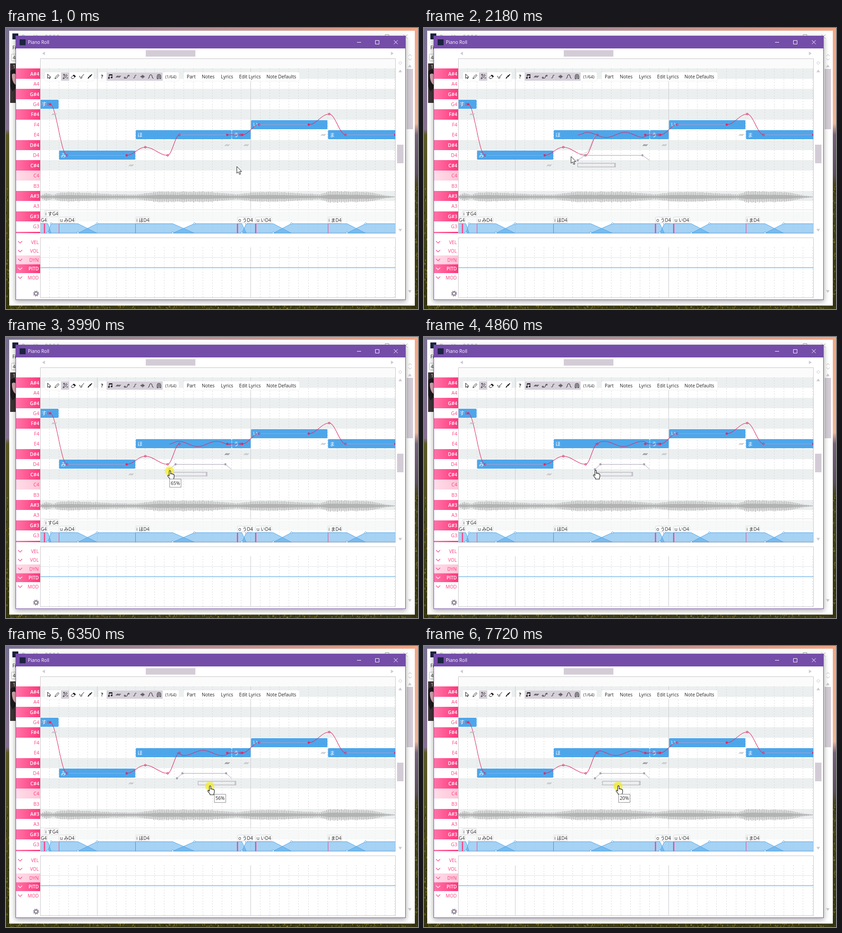
Write an HTML page that moves like this. It is 905 px wide and 619 px high and loops after 8 s.

```html
<!DOCTYPE html>
<html lang="en">
<head>
<meta charset="utf-8">
<title>Piano Roll</title>
<style>
html, body { margin: 0; width: 100%; height: 100%; overflow: hidden; background: #3b3a14; }
svg { display: block; }
text { font: 10.2px 'Open Sans', 'Noto Sans', 'Noto Sans CJK JP', 'Noto Sans CJK', sans-serif; fill: #222; white-space: pre; }
.key { font-size: 10.5px; text-anchor: end; fill: #ff3d80; }
.on { fill: #fff; font-weight: 600; }
.lyric { fill: #fff; font-size: 11px; font-weight: 500; }
.ico { fill: none; stroke: #151515; stroke-linecap: round; stroke-linejoin: round; }
.thin { fill: none; stroke: #151515; stroke-width: .8; }
.solid { fill: #151515; }
.pitch { fill: none; stroke: #dc2c66; stroke-width: 1.1; }
.grey { fill: none; stroke: #aaa0b2; }
</style>
</head>
<body>
<svg id="stage" width="905" height="619" viewBox="0 0 905 619">
<defs>
  <linearGradient id="hot"><stop stop-color="#ff74a6"/><stop offset="1" stop-color="#ff357b"/></linearGradient>
  <linearGradient id="pale"><stop stop-color="#ffdce8"/><stop offset="1" stop-color="#ffc4d8"/></linearGradient>
  <linearGradient id="sky"><stop stop-color="#77708f"/><stop offset=".45" stop-color="#b58f96"/><stop offset="1" stop-color="#f3a684"/></linearGradient>
  <linearGradient id="west" x2="0" y2="1"><stop stop-color="#77708f"/><stop offset=".36" stop-color="#85708e"/><stop offset=".38" stop-color="#5b5a26"/><stop offset="1" stop-color="#33340f"/></linearGradient>
  <linearGradient id="east" x2="0" y2="1"><stop stop-color="#f3a684"/><stop offset=".34" stop-color="#f0b596"/><stop offset=".38" stop-color="#75627a"/><stop offset=".52" stop-color="#5a4d5c"/><stop offset=".56" stop-color="#45431a"/><stop offset="1" stop-color="#33340f"/></linearGradient>
  <radialGradient id="glow"><stop stop-color="#f4ec22" stop-opacity=".8"/><stop offset=".75" stop-color="#f4ec22" stop-opacity=".7"/><stop offset="1" stop-color="#f4ec22" stop-opacity=".4"/></radialGradient>
  <filter id="soft" x="-5%" y="-5%" width="110%" height="112%"><feGaussianBlur stdDeviation="6"/></filter>
  <clipPath id="back"><rect x="7" y="6" width="891" height="606"/></clipPath>
  <clipPath id="roll"><rect x="76" y="67" width="779.5" height="385.5"/></clipPath>
</defs>
<g id="scene"></g>
<g id="live">
  <path id="final" fill="none" stroke="#c2c2c2"/>
  <g id="vib">
    <path id="wave" class="pitch"/>
    <path id="fade" class="grey"/>
    <g id="dots" fill="#aaa0b2"></g>
    <g id="period"><rect x=".5" y="298" width="83" height="8" class="grey"/><path d="M81.5 298v8" class="grey"/></g>
  </g>
  <circle id="halo" r="10.5" fill="url(#glow)"/>
  <path id="arrow" d="M0 0V15L3.5 12L6 17.5L8.4 16.5L6 11.2H10.7Z" fill="#fff" stroke="#111"/>
  <path id="hand" d="M-1.5 1.5Q0-.8 1.6 1.5V7.5Q3.5 6 4.6 8Q6.6 6.8 7.4 8.8Q9.3 8 9.3 10.5V14Q9.3 16 8.2 17.5V20H-.2V18.2L-4.8 12.5Q-5.4 10-3.4 10.2L-1.5 12Z" fill="#fff" stroke="#111" stroke-width="1.1"/>
  <g id="tip"><rect x=".5" y=".5" height="18" fill="#fff" stroke="#888"/><text x="3" y="13.3"></text></g>
</g>
</svg>
<script>
const $ = id => document.getElementById(id);
const out = [];
const put = s => out.push(s);
const rect = (x, y, w, h, fill, more = '') => put(`<rect x="${x}" y="${y}" width="${w}" height="${h}" fill="${fill}" ${more}/>`);
const text = (x, y, s, more = '') => put(`<text x="${x}" y="${y}" ${more}>${s}</text>`);
const path = (d, more = '') => put(`<path d="${d}" ${more}/>`);
const icon = (x, y, d, cls = 'ico') => path(d, `class="${cls}" transform="translate(${x} ${y})"`);
const tri = (x, y, turn) => path('M-4 2.5L0-3.5L4 2.5Z', `fill="#cfc9d2" transform="translate(${x} ${y}) rotate(${turn})"`);

let seed = 7;
const rnd = () => (seed = seed * 16807 % 2147483647) / 2147483647;

const ROW = 22.45, TOP = 100.6, PINK = '#ff3d80', BLUE = '#4ea6ea', THUMB = '#d3ccd6';
const rowY = k => TOP + ROW * k;
const keys = ['A#4', 'A4', 'G#4', 'G4', 'F#4', 'F4', 'E4', 'D#4', 'D4', 'C#4', 'C4', 'B3', 'A#3', 'A3', 'G#3', 'G3', 'F#3'];

function desktop() {
  rect(0, 0, 905, 619, '#3b3a14');
  rect(0, 0, 9, 619, 'url(#west)');
  rect(896, 0, 9, 619, 'url(#east)');
  rect(0, 0, 905, 8, 'url(#sky)');
  const field = ['#8a7d1e', '#5f5c18', '#1f2209', '#a2922c', '#2c3010'];
  for (let i = 0; i < 420; i++) {
    const side = i % 4 === 0;
    const x = side ? (rnd() < .5 ? rnd() * 6 : 898 + rnd() * 6) : rnd() * 905;
    const y = side ? 345 + rnd() * 260 : 610 + rnd() * 7;
    rect(x.toFixed(1), y.toFixed(1), 1.5, 3.5, field[i % 5], 'opacity=".7"');
  }
}

function backWindow() {
  rect(7, 6, 891, 605.5, '#fff');
  rect(14, 12, 13, 13, '#1d2340');
  text(34, 22.5, 'OpenUtau 0.0.0.0', 'style="fill:#999"');
  text(14, 47, 'Fi');
  rect(11.5, 57.5, 20, 15, '#fff', 'stroke="#bbb" rx="2"');
  text(15, 69, '4');
  rect(9, 78, 14, 87, '#3c3338');
  path('M9 96Q16 86 23 96V130L14 140L9 128Z', 'fill="#1d1a20"');
  path('M13 102Q23 96 23 112V126Q13 122 13 102Z', 'fill="#d9a9b4"');
  text(15, 89, '1', 'style="fill:#fff"');
  path('M833 14.5h8v8h-8zM873 14.5l9 9M882 14.5l-9 9', 'fill="none" stroke="#999"');
  path('M884 62l3.5-4 3.5 4M884 67l3.5 4 3.5-4', 'fill="none" stroke="#bbb"');
  tri(887, 84, 0); tri(887, 580, 180);
  rect(880, 90, 14, 133, THUMB);
  put('<g clip-path="url(#back)"><rect x="20" y="20" width="859" height="583" opacity=".32" filter="url(#soft)"/></g>');
}

function frontWindow() {
  rect(21.5, 17.5, 856, 581, '#fff', 'stroke="#744da9"');
  rect(21, 17, 857, 28, '#744da9');
  rect(30, 25, 13, 13, '#1d2340');
  text(48, 35, 'Piano Roll', 'style="fill:#fff"');
  path('M771 31.5h9M811.5 27.5h8v8h-8zM852 27l8.5 8.5M860.5 27l-8.5 8.5', 'fill="none" stroke="#fff"');
  tri(83, 56, -90); tri(848, 56, 90);
  rect(307, 49, 109, 14, THUMB);
  path('M866 73.5l3.5 3.5-3.5 3.5-3.5-3.5z', 'fill="none" stroke="#c4bcc8"');
  tri(866, 95, 0); tri(866, 445, 180);
  rect(859, 257, 14, 41, THUMB);
}

function gridLines(y0, y1) {
  for (let k = -5; k < 32; k++) {
    const bar = k === 0 || k === 16, x = Math.round(200 + k * 21.07) + .5;
    path(`M${x} ${y0}V${y1}`, bar ? 'stroke="#c9c9cd"' : 'stroke="#cfcfd2" stroke-dasharray="2 4"');
  }
}

function keyboard() {
  keys.forEach((k, i) => {
    const y = Math.round(rowY(i) - ROW / 2), h = Math.min(Math.round(rowY(i) + ROW / 2), 452) - y;
    const black = k[1] === '#';
    if (black) {
      rect(76, y, 779, h, '#ecefef');
      rect(22, y, 54, h, 'url(#hot)');
    } else if (k === 'C4') rect(22, y, 54, h, 'url(#pale)');
    if (i < 16) text(73, (rowY(i) + 4).toFixed(1), k, `class="key${black ? ' on' : ''}"`);
  });
}

// Loudness at a few places, joined by straight lines
const loud = [[76, 4], [88, 9], [104, 5], [120, 11], [165, 10], [240, 6], [285, 5], [330, 12], [440, 12], [505, 6], [550, 11], [605, 11], [690, 6], [712, 13], [770, 12], [805, 10], [835, 3], [856, 1]];
function at(list, t, i = 1) {
  const n = list.findIndex(p => p[0] > t);
  if (n === 0) return list[0][i];
  if (n < 0) return list[list.length - 1][i];
  const a = list[n - 1], b = list[n];
  return a[i] + (b[i] - a[i]) * (t - a[0]) / (b[0] - a[0]);
}
function waveform() {
  let bars = '', upper = '', lower = '';
  for (let x = 76; x < 855; x += 4) {
    const a = at(loud, x) * (.85 + .15 * rnd());
    bars += `M${x + .5} ${(372 - a).toFixed(1)}V${(372 + a).toFixed(1)}`;
    upper += `L${x} ${(372 - a * .4).toFixed(1)}`;
    lower = `L${x} ${(372 + a * .4).toFixed(1)}` + lower;
  }
  path(bars, 'stroke="#b3b3b3" stroke-width="2"');
  path('M76 372' + upper + lower + 'Z', 'fill="#b3b3b3"');
}

function phonemes() {
  rect(76, 400, 779, 52, '#fff', 'opacity=".6"');
  path('M76 400.5H855', 'stroke="#dcdcde"');
  const joints = [[50, 60], [92, 99], [158, 200], [366, 414], [518, 528], [587, 627], [749, 790], [880, 900]];
  for (let i = 0; i < 7; i++) {
    const [b, t] = joints[i], [e, f] = joints[i + 1];
    path(`M${b} 452L${t} 431H${e}L${f} 452Z`, `fill="${BLUE}" fill-opacity=".5" stroke="${BLUE}"`);
  }
  for (const [x, w] of [[84.5, 2.5], [116.5, 1], [284.5, 1], [508.5, 2.5], [548.5, 2.5], [707.5, 1]])
    path(`M${x} 431V452`, `stroke="${PINK}" stroke-width="${w}"`);
  for (const [b, t] of joints.slice(1, 7))
    for (const [x, y] of [[b, 451], [t, 431]])
      put(`<circle cx="${x}" cy="${y}" r="2" fill="#fff" stroke="${BLUE}"/>`);
  const label = (x, y, w, s) => {
    rect(x + .5, y + .5, w, 13, '#fff', 'stroke="#d6d6da" rx="2"');
    text(x + 2.5, y + 11, s, 'style="font-size:10px"');
  };
  label(74, 416, 16, 'G4');
  label(84, 402, 31, 'i すG4');
  label(116, 416, 35, 'u みD4');
  label(284, 416, 31, 'i ほD4');
  label(508, 416, 33, 'o うD4');
  label(548, 416, 35, 'u いD4');
  label(706, 416, 31, 'i まD4');
}

const ZIGZAG = 'M-5.5 2l4-4-1 4 4-4-1 4 4-4M-5.5 2l3-3.6M1.5 2l4-3.6';
function squiggle(x, y, id = '') {
  path(ZIGZAG, `${id} fill="none" stroke="#b8b8ba" transform="translate(${x} ${y})"`);
}

// Sine ease in and out between two points
const ease = (x0, y0, x1, y1) => `M${x0} ${y0}C${x0 + (x1 - x0) * .364} ${y0} ${x1 - (x1 - x0) * .364} ${y1} ${x1} ${y1}`;

function notes() {
  const list = [['す', 74, 115.5, 3], ['み', 116.5, 284, 8], ['ほ', 285, 495.5, 6], ['う', 496.2, 537.5, 6], ['い', 538.2, 706, 5], ['ま', 707.3, 860, 6]];
  for (const [s, x, e, row] of list) {
    rect(x, Math.round(rowY(row) - 10), e - x, 20, BLUE, 'rx="2"');
    text(x + 4, (rowY(row) + 4.5).toFixed(1), s, 'class="lyric"');
  }
  const soft = 'stroke="#b59fcb"';
  path('M134 280.5H265M556 212.8H665M746 235.5H855M76 168H93M486 235.5H515', soft);
  path('M381 235.5H486', soft + ' id="flat"');
  path(ease(97, 168, 134, 280.5) + ease(265, 280.5, 306, 262.5) + ease(306, 262.5, 355, 280.5) + ease(355, 280.5, 381, 235.5)
    + ease(519, 235.5, 556, 212.8) + ease(665, 212.8, 710, 189.5) + ease(710, 189.5, 746, 235.5) + 'M486 235.5H519', 'class="pitch"');
  const dot = (x, y, full) => put(`<circle cx="${x}" cy="${y}" r="2.1" fill="${full ? '#dc2c66' : 'none'}" stroke="#dc2c66"/>`);
  for (const [x, y] of [[93, 168], [134, 280.5], [306, 262.5], [355, 280.5], [381, 235.5], [515, 235.5], [556, 212.8], [710, 189.5], [746, 235.5]]) dot(x, y);
  for (const [x, y] of [[97, 168], [265, 280.5], [486, 235.5], [519, 235.5], [665, 212.8], [855, 235.5]]) dot(x, y, true);
  squiggle(106, 190); squiggle(275, 302.5); squiggle(486, 258, 'id="mark"'); squiggle(528, 258); squiggle(697, 235.5);
}

function toolbar() {
  for (const [x, w] of [[85, 108], [203, 177], [390, 255]]) rect(x, 97, w, 20, '#fff', 'rx="3" stroke="#e4e4e6" stroke-width=".6"');
  rect(121, 98, 18, 18, '#d6d0da');
  rect(221, 98, 123, 18, '#d6d0da');
  const y = 107, pen = 'M-4.5 4.5l1-3 6-6 2 2-6 6z';
  icon(94, y, 'M-2.5-5V4L0 2L1.5 5L2.8 4.3L1.5 1.5H4Z');
  icon(112, y, pen);
  icon(130, y, pen + 'M-4-4h3M-2.5-5.5v3M3 3h3');
  icon(148, y, 'M-5 2l6-6 4 3.5-5 5h-3z');
  icon(148, y, 'M-1-2l2-2 4 3.5-2 2z', 'solid');
  icon(166, y, 'M5-5L0 1M-5-1q2 0 2 3t4 1l-1-3');
  icon(184, y, 'M4.5-5.5l1 1-5 6-2.5-2zM-2.5 0l2 2q-2 3-4.5 2.5q1-1 2.5-4.5z', 'solid');
  text(208.5, 111, '?', 'style="font-weight:700"');
  icon(229, y, 'M-2.5 3V-4H4V2');
  icon(229, y, 'M-2.5-5H4.5V-2.5H-2.5zM-5 3a2 1.7 0 1 0 4 0a2 1.7 0 1 0-4 0M1 2a2 1.7 0 1 0 4 0a2 1.7 0 1 0-4 0', 'solid');
  icon(247, y, ZIGZAG, 'thin');
  icon(265, y, 'M-5.5 2.5a1.5 1.5 0 1 0 3 0a1.5 1.5 0 1 0-3 0M-2.5 3.5q4 1 4-2.5t2-2.5M3-2a1.4 1.4 0 1 0 2.8 0a1.4 1.4 0 1 0-2.8 0');
  icon(283, y, 'M-3 3q3 1 3-3t3-3');
  icon(300, y, 'M-5 0H5M-3-1.5v3M-1.2-3.5v7M.6-4v8M2.4-2.5v5', 'thin');
  icon(318, y, 'M-5.5 4q2 0 2.5-4t2-4h2q1.5 0 2 4t2.5 4');
  icon(336, y, 'M-4 4.5V-1a4 4 0 0 1 8 0V4.5H1.5V-1a1.5 1.5 0 0 0-3 0V4.5Z');
  text(350, 110.5, '(1/64)', 'style="font-size:9px"');
  for (const [x, s] of [[397, 'Part'], [430, 'Notes'], [472, 'Lyrics'], [512, 'Edit Lyrics'], [572, 'Note Defaults']]) text(x, 111, s);
}

function curvePanel() {
  rect(76, 462, 779, 131, '#fff');
  gridLines(483, 593);
  path('M76 505.5H855', 'stroke="#dde4ea"');
  path('M76 528H855', 'stroke="#74b8ea" stroke-width="1.5"');
  ['VEL', 'VOL', 'DYN', 'PITD', 'MOD'].forEach((s, i) => {
    const y = 471.5 + i * 19.5, hot = s === 'PITD';
    if (hot || s === 'DYN') rect(22, y - 9.5, 54, 19.5, hot ? 'url(#hot)' : 'url(#pale)');
    text(72, y + 4, s, `class="key${hot ? ' on' : ''}" style="font-size:10.2px"`);
    path(`M26.5 ${y - 2}l4.5 4.5 4.5-4.5`, `fill="none" stroke="${hot ? '#fff' : PINK}" stroke-width="1.2"`);
  });
  put('<g transform="translate(66 585)" fill="none" stroke="#95899c"><circle r="3.6" stroke-width="2.6"/><circle r="5.6" stroke-width="2" stroke-dasharray="2.2 2.198"/></g>');
  path('M75.5 594V462H855.5V594Z', 'fill="none" stroke="#c6c4c8"');
}

desktop();
backWindow();
frontWindow();
rect(76, 67, 779, 22, '#fbfbfb');
keyboard();
put('<g clip-path="url(#roll)">');
gridLines(89, 452);
waveform();
phonemes();
notes();
put('</g>');
path('M75.5 452.5V67.5H855.5V452.5Z', 'fill="none" stroke="#c6c4c8"');
toolbar();
curvePanel();
$('scene').innerHTML = out.join('');
$('dots').innerHTML = '<circle r="2.4"/>'.repeat(3);

// Pointer: time, x, y
const moves = [
  [0, 507, 305], [70, 507, 305], [450, 492, 278], [820, 482, 257], [1700, 482, 257], [1900, 405, 268], [2180, 323, 283], [2450, 322, 292],
  [2520, 322, 292], [2650, 335, 297], [2790, 340, 291], [3380, 340, 291], [3381, 338, 293], [3650, 338, 293], [3910, 360, 294], [3990, 360, 294], [4190, 364, 294],
  [4390, 364, 294], [4620, 377, 293], [4870, 377, 293], [5140, 411, 307], [5480, 411, 307], [5690, 464, 309], [5760, 473, 309.5],
  [5900, 485, 310], [6040, 485, 309], [6220, 461, 309], [6300, 456, 308], [6770, 385, 305], [6840, 382, 304], [7040, 370, 304],
  [7110, 370, 304], [7650, 427, 307.5]
];
const END = 495.5, NOTE = 210.5, MID = 235.5, PERIOD = 83, LAG = 70;
const clamp = (v, a, b) => Math.min(b, Math.max(a, v));
const within = (t, a, b) => t >= a && t < b;
const show = (id, on) => $(id).style.display = on ? '' : 'none';
const place = (id, x, y) => $(id).setAttribute('transform', `translate(${x.toFixed(1)} ${y.toFixed(1)})`);

function basePitch(x) {
  const io = (x0, y0, x1, y1) => y0 + (y1 - y0) * (1 - Math.cos(Math.PI * (x - x0) / (x1 - x0))) / 2;
  return x < 355 ? io(306, 262.5, 355, 280.5) : x < 381 ? io(355, 280.5, 381, MID) : MID;
}

function draw(t) {
  const x = at(moves, t), y = at(moves, t, 2), lagX = at(moves, t - LAG);
  const sizing = within(t, 3650, 4660), shifting = t >= 5480, on = t >= 1550;
  const size = t < 3650 ? 75 : t < 4660 ? clamp(Math.round((END - lagX + 1) / NOTE * 100), 57, 75) : 57;
  const shift = shifting ? clamp(Math.round((lagX - 410.4) / PERIOD * 100), 0, 100) : 0;

  const len = NOTE * size / 100, start = END - len;
  const swing = p => 5.6 * Math.sin(2 * Math.PI * (p / PERIOD + shift / 100)) * Math.min(1, p / len * 10, (len - p) / len * 10);
  let wave = '', final = '';
  for (let p = 0; p <= len; p += 1.5) {
    const px = start + p, v = swing(p), cmd = p ? 'L' : 'M';
    wave += `${cmd}${px.toFixed(1)} ${(MID - v).toFixed(2)}`;
    if (px < 381) final += `${cmd}${px.toFixed(1)} ${(basePitch(px) - v).toFixed(2)}`;
  }
  $('wave').setAttribute('d', wave);
  $('final').setAttribute('d', final);
  const pts = [[start, 291.5], [start + len / 10, 280.5], [END - len / 10, 280.5], [END, 291.5]];
  $('fade').setAttribute('d', 'M' + pts.join('L'));
  [...$('dots').children].forEach((c, i) => { c.setAttribute('cx', pts[i][0]); c.setAttribute('cy', pts[i][1]); });
  place('period', start + PERIOD * shift / 100 - .5, 0);
  show('vib', on);
  show('final', on && t < 3650);
  show('flat', !on);
  $('mark').setAttribute('stroke', on ? '#77777b' : '#b8b8ba');

  const hand = within(t, 800, 1720) || t >= 3380;
  show('hand', hand);
  show('arrow', !hand);
  place(hand ? 'hand' : 'arrow', x, y);
  show('halo', within(t, 1500, 1700) || sizing || shifting);
  place('halo', x - 1, y + 1);

  show('tip', sizing || shifting);
  const s = (sizing ? size : shift) + '%';
  const [box, label] = $('tip').children;
  box.setAttribute('width', s.length * 6 + 7);
  label.textContent = s;
  place('tip', lagX - (sizing ? 1 : 0), y + 18.5);
}

const began = performance.now();
function tick() {
  draw((performance.now() - began) % 8000);
  requestAnimationFrame(tick);
}
tick();
</script>
</body>
</html>
```
